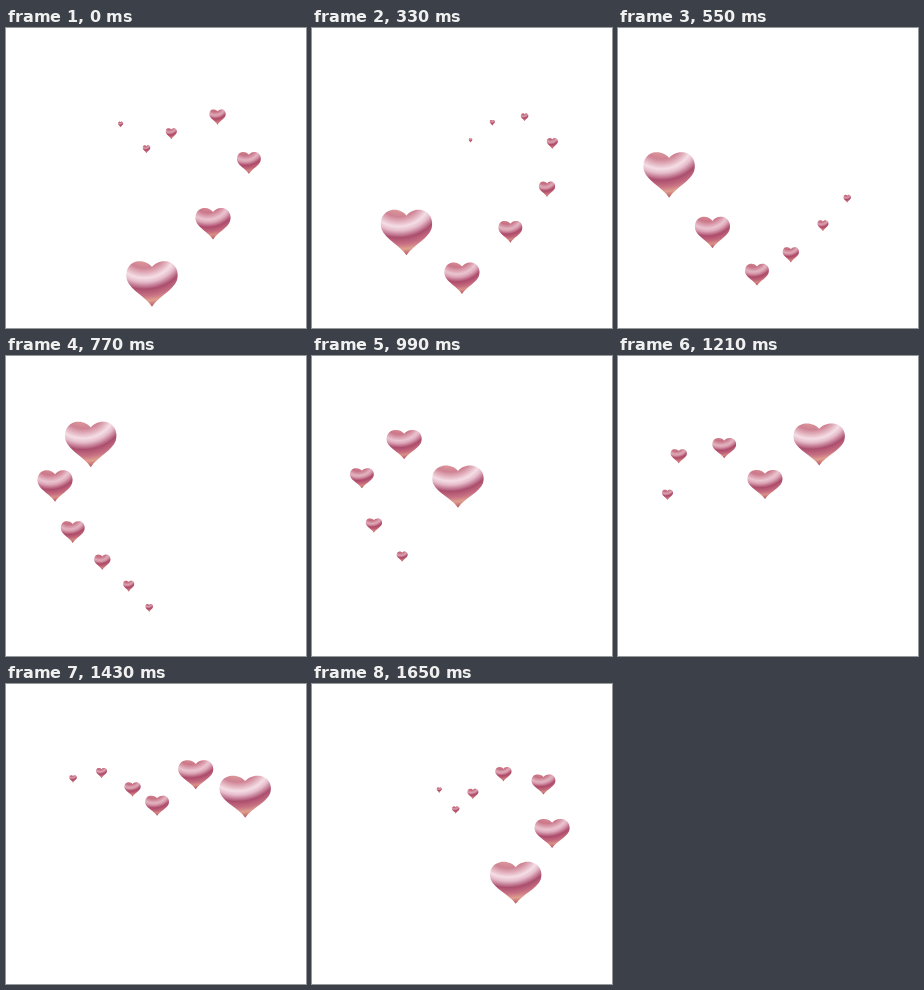
Animation, 300 px wide and 300 px high, one loop 1.98 s. Source, as an HTML page with a canvas:

```html
<!DOCTYPE html>
<html>
<head>
<meta charset="utf-8">
<title>Hearts</title>
<style>
html, body { margin: 0; height: 100%; overflow: hidden; background: #fff; }
canvas { display: block; }
</style>
</head>
<body>
<canvas id="stage" width="300" height="300"></canvas>
<script>
const ctx = document.getElementById('stage').getContext('2d');
const LOOP = 1980, FIRST = 330, STEP = 220;
const SIZE = 51, SHRINK = .68, CLOSER = .84;

// Steps: leader's place on the track (0 to 1), first gap in the trail, hearts shown
const steps = [
  [0, 86, 7], [.121, 80, 8], [.242, 73, 6], [.37, 60, 6],
  [.5, 71, 5], [.62, 70, 5], [.7, 60, 6], [.865, 62, 7]
];

// Heart-shaped track, from the tip up the left side, through the notch and down the right
function trackPoint(a) {
  const s = Math.sin(a);
  const x = 146 + 97 * Math.sign(s) * Math.abs(s) ** 2.3;
  const y = 156.8 - 5.7 * (13 * Math.cos(a) - 5.4 * Math.cos(2 * a) - 2 * Math.cos(3 * a) - Math.cos(4 * a));
  return x.toFixed(2) + ' ' + y.toFixed(2);
}
const points = Array.from({ length: 360 }, (_, i) => trackPoint(Math.PI * (1 + i / 180)));
const track = document.createElementNS('http://www.w3.org/2000/svg', 'path');
track.setAttribute('d', 'M' + points.join('L') + 'Z');
const trackLength = track.getTotalLength();

// Unit heart, one wide and one high, centred on the origin
const shape = new Path2D(
  'M0-.37C-.06-.46-.17-.52-.31-.49C-.46-.45-.54-.27-.49-.08C-.42.14-.14.26 0 .5' +
  'C.14.26.42.14.49-.08C.54-.27.46-.45.31-.49C.17-.52.06-.46 0-.37Z');

// Curved bands of light around a point above the heart
const sheen = ctx.createRadialGradient(-.15, -.75, .25, -.15, -.75, 1.27);
[[0, '#dc979a'], [.15, '#cf8293'], [.36, '#f4dee6'], [.45, '#e6bccb'], [.6, '#ab4e6e'],
 [.74, '#c77083'], [.85, '#e0a08f'], [1, '#b0505f']].forEach(s => sheen.addColorStop(...s));

function heart(x, y, w, h) {
  ctx.save();
  ctx.translate(x, y);
  ctx.scale(w, h);
  ctx.fillStyle = sheen;
  ctx.fill(shape);
  // Smaller hearts are deeper in colour
  ctx.fillStyle = `rgba(178,66,92,${.5 * (1 - w / SIZE)})`;
  ctx.fill(shape);
  ctx.restore();
}

function draw(t) {
  const k = t < FIRST ? 0 : Math.min(7, 1 + Math.floor((t - FIRST) / STEP));
  const [place, firstGap, count] = steps[k];
  const squash = k < 4 ? .87 : .8;
  ctx.fillStyle = '#fff';
  ctx.fillRect(0, 0, 300, 300);
  let at = place * trackLength, gap = firstGap, w = SIZE;
  for (let i = 0; i < count; i++) {
    const p = track.getPointAtLength((at + trackLength) % trackLength);
    heart(p.x, p.y, w, w * squash + 1.3);
    at -= gap;
    gap *= CLOSER;
    w *= SHRINK;
  }
}

const start = performance.now();
function tick() {
  draw((performance.now() - start) % LOOP);
  requestAnimationFrame(tick);
}
tick();
</script>
</body>
</html>
```
